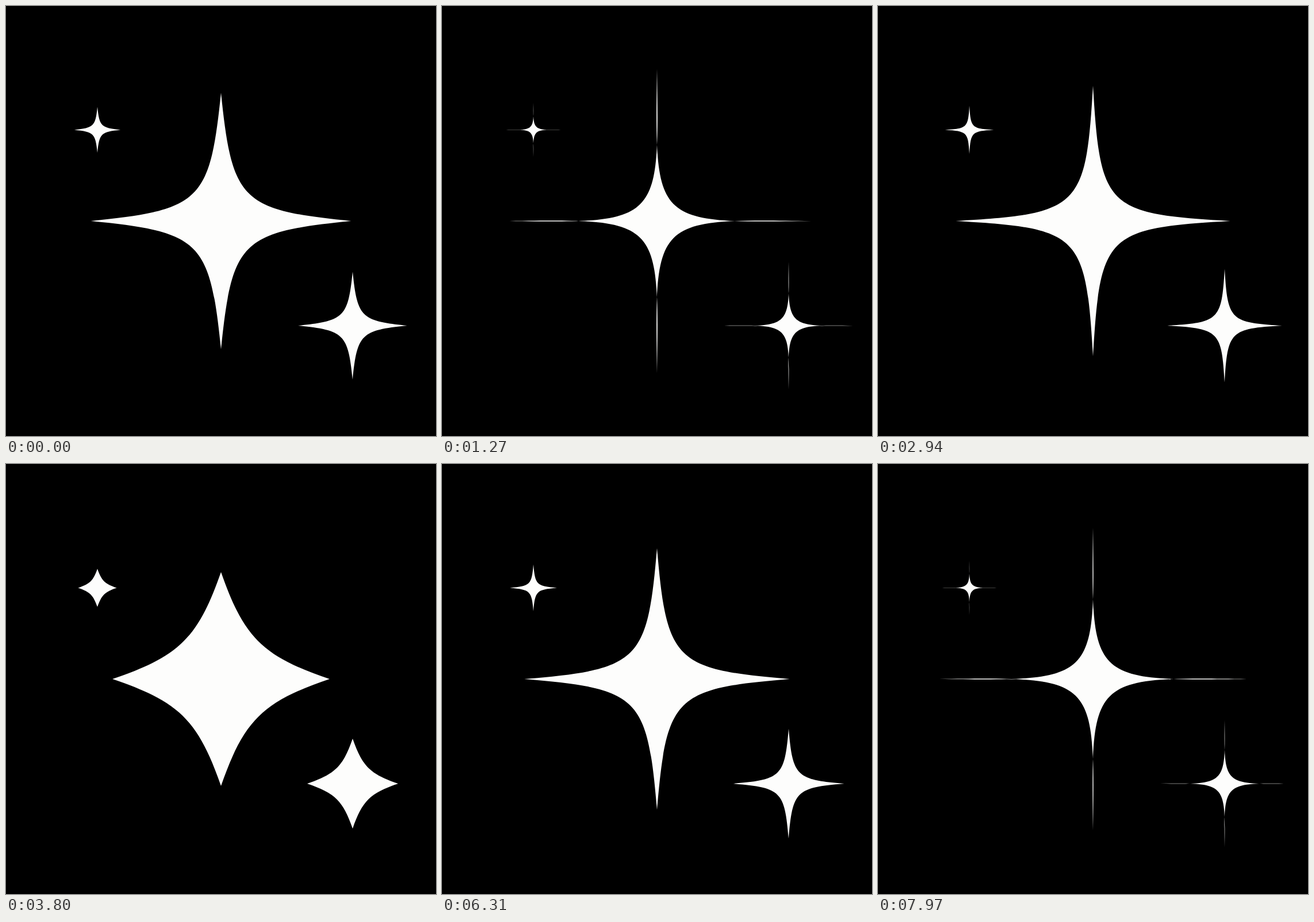
Animation, 748 px wide and 748 px high, one loop 8 s. Source, as an HTML page:

```html
<!DOCTYPE html>
<html lang="en">
<head>
<meta charset="utf-8">
<title>Sparkles</title>
<style>
  html, body { margin: 0; width: 100%; height: 100%; overflow: hidden; background: #000; }
  svg { display: block; width: 100%; height: 100%; }
</style>
</head>
<body>
<svg viewBox="0 0 748 748" fill="#fdfdfc">
  <path transform="translate(374 374) scale(1.015 1)"/>
  <path transform="translate(603 556) scale(.425 .42)"/>
  <path transform="translate(159 215.4) scale(.18 .1785)"/>
</svg>
<script>
  const LOOP = 8000, FPS = 30;
  const RADIUS = 128.75;   // circle before puckering
  const KAPPA = 0.5523;    // cubic handle length of a quarter circle
  // [seconds, tip distance], linear in between
  const KEYS = [[0, 223], [1.997, 288.3], [3.96, 177], [8, 264.2]];
  const stars = document.querySelectorAll('path');

  function tipAt(seconds) {
    const i = Math.max(1, KEYS.findIndex(key => key[0] >= seconds));
    const [t0, v0] = KEYS[i - 1], [t1, v1] = KEYS[i];
    return v0 + (v1 - v0) * (seconds - t0) / (t1 - t0);
  }

  // Puckered circle: anchors move outwards as far as the handles move inwards.
  function starPath(tip) {
    const h = 2 * RADIUS - tip, k = h * KAPPA;
    let x = 1, y = 0, d = `M${tip} 0`;
    for (let i = 0; i < 4; i++) {
      const nx = -y, ny = x;
      const at = (a, b) => `${x * a + nx * b} ${y * a + ny * b} `;
      d += 'C' + at(h, k) + at(k, h) + at(0, tip);
      [x, y] = [nx, ny];
    }
    return d + 'Z';
  }

  function draw() {
    const ms = performance.now() % LOOP;
    const frame = Math.min(LOOP * FPS / 1000 - 1, Math.floor((ms + 5) * FPS / 1000));
    const d = starPath(tipAt(frame / FPS));
    stars.forEach(star => star.setAttribute('d', d));
    requestAnimationFrame(draw);
  }
  draw();
</script>
</body>
</html>
```
